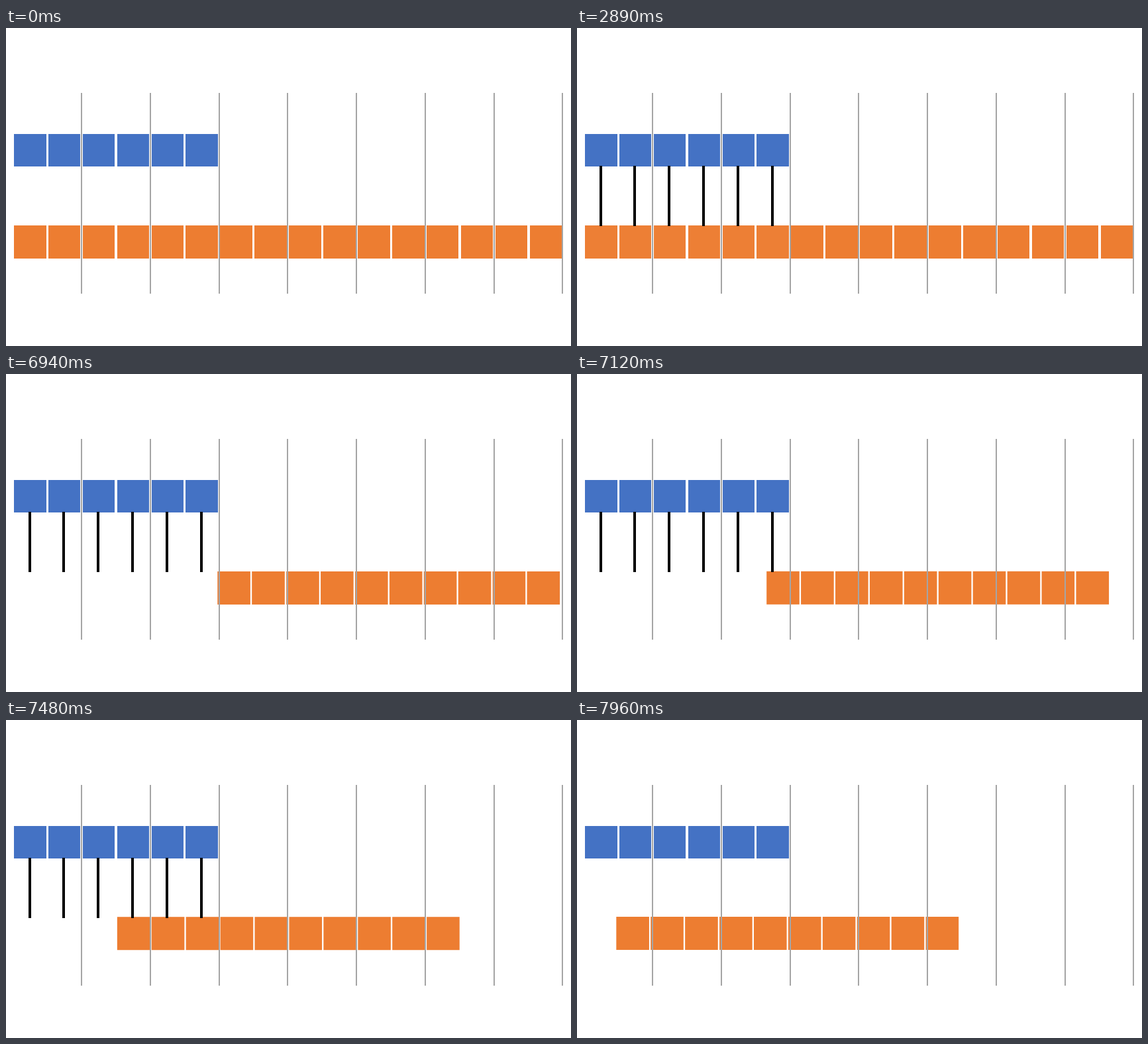
Animation of 853 by 480 pixels, one loop 8 s. Source, as an HTML page with a canvas:

```html
<!DOCTYPE html>
<html lang="en">
<head>
<meta charset="utf-8">
<title>Two rows of blocks</title>
<style>
  html, body { margin: 0; width: 100%; height: 100%; overflow: hidden; background: #fff; }
  canvas { display: block; width: 100%; height: 100%; }
</style>
</head>
<body>
<canvas id="stage" width="853" height="480"></canvas>
<script>
const LOOP = 8000, STEP = 60;
const LINKS_IN = 500, FADE = 2890, SLIDE = 6940, LINKS_OUT = 7720;
const BLUE = '#4472c4', ORANGE = '#ed7d31', GRAY = '#a5a5a5', BLACK = '#000';
const PAIRED = 6, TOTAL = 16;

const ctx = document.getElementById('stage').getContext('2d');
const stepped = (t, start) => start + Math.floor((t - start) / STEP) * STEP;

function rect(color, x, y, w, h) {
  ctx.fillStyle = color;
  ctx.fillRect(x, y, w, h);
}

// Blocks at rest sit on whole pixels.
function block(color, i, y, h) {
  const left = Math.floor(12.35 + 51.92 * i);
  const right = Math.floor(61 + 51.91 * i);
  rect(color, left, y, right - left, h);
}

// Quick acceleration, then a longer even slowdown.
function slideOffset(t) {
  if (t < 7200) return -4 * ((t - 6852) / 88) ** 2;
  return (0.0117 * (8546 - t)) ** 2 - 311;
}

function pairedOpacity(t) {
  if (t < FADE) return 1;
  const p = (stepped(t, FADE) - FADE) / (4 * STEP);
  return Math.max(0, Math.min(0.98, 1 - p));
}

function drawOrange(t) {
  ctx.globalAlpha = pairedOpacity(t);
  for (let i = 0; i < PAIRED; i++) block(ORANGE, i, 298, 50);
  ctx.globalAlpha = 1;

  const dx = t < SLIDE ? 0 : slideOffset(stepped(t, SLIDE));
  const dy = Math.max(-1, dx / 200);
  for (let i = PAIRED; i < TOTAL; i++) {
    if (dx) rect(ORANGE, 323.3 + 51.92 * (i - PAIRED) + dx, 298 + dy, 49.6, 50);
    else block(ORANGE, i, 298, 50);
  }
}

function draw(t) {
  rect('#fff', 0, 0, 853, 480);
  for (let i = 0; i < PAIRED; i++) block(BLUE, i, 160, 49);
  drawOrange(t);
  for (let i = 0; i < 8; i++) rect(GRAY, Math.floor(113.5 + 103.75 * i), 98, 2, 303);
  if (t >= LINKS_IN && t < LINKS_OUT) {
    for (let i = 0; i < PAIRED; i++) rect(BLACK, Math.floor(34 + 51.85 * i), 208, 4, 91);
  }
}

function tick() {
  draw(performance.now() % LOOP);
  requestAnimationFrame(tick);
}
tick();
</script>
</body>
</html>
```
